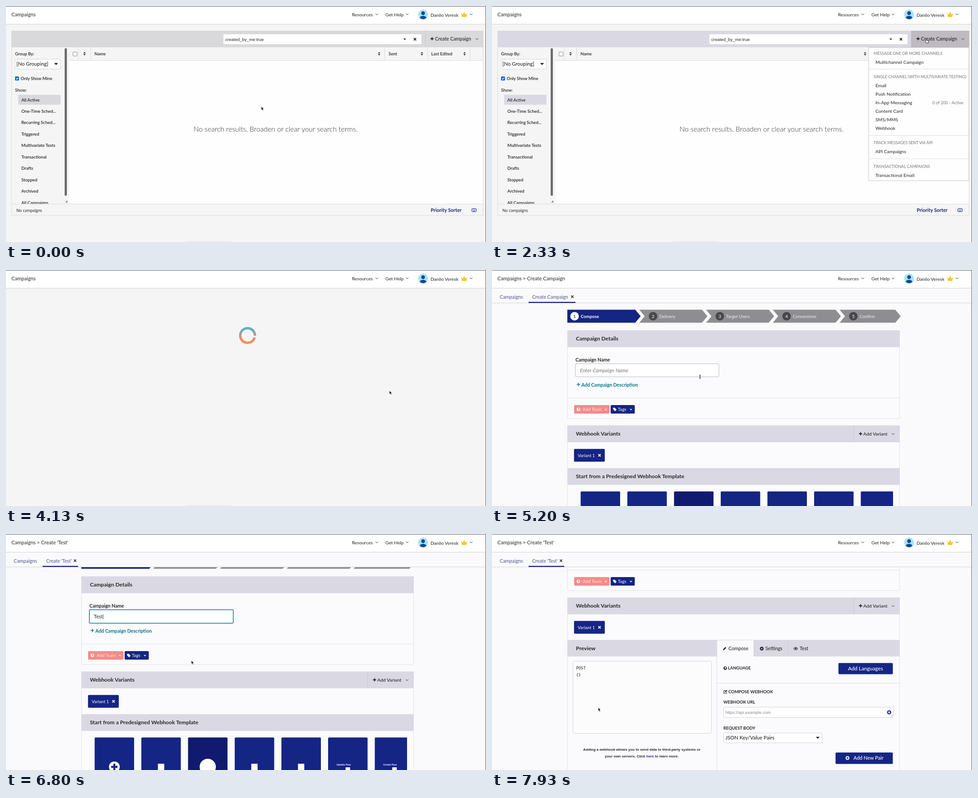
Write an HTML page that moves like this. It is 1064 px wide and 526 px high and loops after 8000 ms.

```html
<!DOCTYPE html>
<html lang="en">
<head>
<meta charset="utf-8">
<title>Create a webhook campaign</title>
<style>
  html, body { margin: 0; width: 100%; height: 100%; overflow: hidden; background: #f5f5f5; }
  svg { display: block; width: 1064px; height: 526px; font-family: Lato, sans-serif; }
  .arial { font-family: "Liberation Sans", Arial, sans-serif; }
  .mono { font-family: "DejaVu Sans Mono", monospace; }
  .italic { font-style: italic; }
  .mid { text-anchor: middle; }
  .dashed { stroke-dasharray: 3 2; }
  .dotted { stroke-dasharray: 1 1; }
</style>
</head>
<body>
<svg id="stage" viewBox="0 0 1064 526"></svg>
<script>
const LOOP = 8000;
const INK = '#252528', NAVY = '#152584', LILAC = '#dad9e3', TEAL = '#03788a', RULE = '#dcdce0', PAGE = '#fafafc';
const stage = document.getElementById('stage');

// Drawing helpers
const text = (x, y, s, size = 10.3, weight = 400, fill = INK, cls = '') =>
  `<text x="${x}" y="${y}" font-size="${size}" font-weight="${weight}" fill="${fill}" class="${cls}">${s}</text>`;
const rect = (x, y, w, h, fill, rx = 0, stroke = 'none', width = 1) =>
  `<rect x="${x}" y="${y}" width="${w}" height="${h}" fill="${fill}" rx="${rx}" stroke="${stroke}" stroke-width="${width}"/>`;
const box = (x, y, w, h, fill, rx, stroke) => rect(x + .5, y + .5, w - 1, h - 1, fill, rx, stroke);
const path = (d, fill, stroke = 'none', width = 1, cls = '') =>
  `<path d="${d}" fill="${fill}" stroke="${stroke}" stroke-width="${width}" class="${cls}"/>`;
const line = (d, stroke = INK, width = 1, cls = '') => path(d, 'none', stroke, width, cls);
const dot = (x, y, r, fill) => `<circle cx="${x}" cy="${y}" r="${r}" fill="${fill}"/>`;
const group = (body, attrs) => `<g ${attrs}>${body}</g>`;
const hline = (x, y, w, color = RULE) => rect(x, y, w, 1, color);
const vline = (x, y, h, color = RULE) => rect(x, y, 1, h, color);

// Icons
const chevron = (x, y) => line(`M${x - 2.8} ${y - 1.4}l2.8 2.8 2.8-2.8`, INK, 1);
const caret = (x, y, w = 3, fill = INK) => path(`M${x - w} ${y - w / 2}h${2 * w}l${-w} ${w * 1.15}z`, fill);
const plus = (x, y, r, color = INK, width = 2) => line(`M${x - r} ${y}h${2 * r}M${x} ${y - r}v${2 * r}`, color, width);
const cross = (x, y, color = INK) => line(`M${x - 2.6} ${y - 2.6}l5.2 5.2m0-5.2l-5.2 5.2`, color, 1.9);
const plusDot = (x, y, r, fill, mark) => dot(x, y, r, fill) + plus(x, y, r * .58, mark, r * .36);
const sorter = (x, y) => path(`M${x - 2.7} ${y - .7}l2.7-3 2.7 3zM${x - 2.7} ${y + .9}l2.7 3 2.7-3z`, INK);
const globe = (x, y, land, sea) =>
  dot(x, y, 3.8, land) + path(`M${x - .6} ${y - 2.4}l2.6.3.6 1.8-2 .8-.4 2.2-1.5-2.2z`, sea);
const resizer = (x, y) => path(`M${x} ${y}v-5l-5 5z`, '#88888b');

// Timing helpers
const clamp01 = v => Math.max(0, Math.min(1, v));
const smooth = k => k * k * (3 - 2 * k);
function track(keys, t, ease = k => k) {
  const i = keys.findIndex(k => k[0] > t);
  if (i < 0) return keys[keys.length - 1].slice(1);
  if (i === 0) return keys[0].slice(1);
  const a = keys[i - 1], b = keys[i], k = ease(clamp01((t - a[0]) / (b[0] - a[0])));
  return a.slice(1).map((v, n) => v + (b[n + 1] - v) * k);
}

const HOVER = 1930, MENU = 2200, LOADING = 3330, FORM = 4730, FOCUS = 5530, TYPING = 5730, PICKED = 7600;
const SCROLL = [[6600, 0], [6730, 10], [6800, 40], [7000, 160], [7200, 205]];
const POINTER = [
  [0, 566, 224], [800, 566, 224], [1800, 963, 73], [2400, 963, 73], [2900, 864, 268], [3400, 850, 269],
  [4130, 850, 269], [4530, 800, 282], [5130, 461, 238], [5330, 461, 238], [5500, 440, 224],
  [6300, 440, 224], [6500, 411, 282], [7130, 411, 282], [7530, 235.5, 387]
];

function header(crumb) {
  return rect(0, 0, 1064, 40, '#fff') + hline(0, 40, 1064, '#cfcfd1') +
    text(12, 22.5, crumb, 11.2) +
    text(767, 22.5, 'Resources') + chevron(822, 18.5) +
    text(841, 22.5, 'Get Help') + chevron(889, 18.5) +
    dot(924.5, 19, 11, '#a8e4fa') + dot(924.5, 16, 4.2, '#104a96') +
    path('M917.3 26.5c0-6 14.4-6 14.4 0q-7 6-14.4 0z', '#104a96') +
    text(941, 24, 'Danilo Veresk') +
    path('M1009 15.5l3.2 4 3.3-6.5 3.3 6.5 3.2-4-1.4 9h-10.2z', '#f2ca24') + chevron(1031, 18.5);
}

function listPage(t) {
  const bar = t < HOVER ? '#d9d8da' : LILAC, grey = '#f5f5f6';
  const views = ['All Active', 'One-Time Sched...', 'Recurring Sched...', 'Triggered', 'Multivariate Tests',
    'Transactional', 'Drafts', 'Stopped', 'Archived', 'All Campaigns'];
  const label = (x, y, s) => text(x, y, s, 9.6, 600);
  return rect(12, 92, 1046, 350, '#fefefe') + rect(12, 92, 128, 350, grey) + rect(140, 92, 918, 29, grey) +
    hline(140, 121, 918) + [160, 187, 839, 934, 1028].map(x => vline(x, 92, 29)).join('') +
    rect(12, 55, 1046, 37, bar) +
    rect(482, 63, 439, 22, '#fff', 1) + text(486, 77.5, 'created_by_me:true', 9.6, 400, INK, 'arial') +
    caret(884, 74) + cross(906.5, 74) +
    (t < HOVER ? line('M929.5 55v37', '#bcbcc0', 1, 'dashed') : rect(929, 55, 129, 37, '#bfbac1')) +
    plus(944.5, 73, 3.6) + text(951, 77, 'Create Campaign', 10.6, 500) + chevron(1044, 73.5) +
    label(20, 110, 'Group By:') + box(20, 118, 101, 23, '#fff', 2, '#d0d0d4') +
    text(23, 133, '[No Grouping]', 11.3, 500) + caret(111, 129, 4.2) +
    rect(20, 157, 9, 9, '#0b68e0', 1.5) + line('M22 161.5l2 2 3.3-4.2', '#fff', 1.3) +
    label(32.5, 165, 'Only Show Mine') + label(20, 190.5, 'Show:') +
    rect(27, 198, 94, 22, bar, 1) +
    views.map((v, i) => label(34, 212.5 + 25.47 * i, v)).join('') +
    rect(130, 94, 5, 329, '#6d6d70', 2.5) + resizer(136, 438) +
    box(148, 102, 10, 10, '#fff', 1.5, '#88888c') +
    [174, 827, 922, 1016.5].map(x => sorter(x, 106.3)).join('') +
    label(196, 110, 'Name') + label(848, 110, 'Sent') + label(942.5, 110, 'Last Edited') +
    text(597.5, 279.5, 'No search results. Broaden or clear your search terms.', 15.7, 300, '#2c2c2f', 'mid') +
    rect(12, 442, 1046, 24, grey) + hline(12, 441, 1046) + hline(12, 466, 1046) +
    vline(12, 92, 375) + vline(1057, 92, 375) +
    text(23, 458.5, 'No campaigns', 9.2) + text(941.5, 458.5, 'Priority Sorter', 10.8, 700, '#1b2870') +
    box(1032, 451, 11, 8, '#e8e9f4', 1, '#1b2870') +
    line('M1034 453.7h7', '#1b2870', 1, 'dotted') + line('M1035 456.5h5', '#1b2870') +
    (t >= MENU ? menu() : '');
}

function menu() {
  const head = (y, s) => text(846, y, s, 8.8, 400, '#727277');
  const items = [['Multichannel Campaign', 129], ['Email', 181], ['Push Notification', 200], ['In-App Messaging', 219],
    ['Content Card', 238], ['SMS/MMS', 257], ['Webhook', 276], ['API Campaigns', 328], ['Transactional Email', 381]];
  return box(834.5, 92, 223, 298, '#fefefe', 0, '#c6c6cb') +
    [140, 288, 340].map(y => hline(835, y, 222)).join('') +
    head(108.5, 'MESSAGE ONE OR MORE CHANNELS') + head(161, 'SINGLE CHANNEL (WITH MULTIVARIATE TESTING)') +
    head(308, 'TRACK MESSAGES SENT VIA API') + head(360.5, 'TRANSACTIONAL CAMPAIGNS') +
    items.map(([s, y]) => text(850, y, s)).join('') +
    text(976, 218.5, '0 of 200 - Active', 9.4, 400, '#727277');
}

function spinner(t) {
  const turn = 16 + (t - 4130) * .36;
  return `<linearGradient id="ring" x1="0" y1="0" x2="0" y2="1" gradientTransform="rotate(-16 .5 .5)">
    <stop offset=".1" stop-color="#62b1bf"/><stop offset=".52" stop-color="#d58b90"/><stop offset=".9" stop-color="#ff8b54"/>
    </linearGradient><circle cx="535.5" cy="146" r="16.3" fill="none" stroke="url(#ring)" stroke-width="5.4"
    pathLength="360" stroke-dasharray="346 14" transform="rotate(${turn} 535.5 146)"/>`;
}

function steps() {
  return ['Compose', 'Delivery', 'Target Users', 'Conversions', 'Confirm'].map((name, i) => {
    const x = i ? 178.5 + 148 * i : 167, end = Math.min(317.5 + 148 * i, 894), cx = i ? 209 + 148 * i : 183;
    return path(`M${x} 88.5H${end}l12 14.5-12 14.5H${x}${i ? 'l12-14.5' : ''}z`, i ? '#8e8d92' : NAVY) +
      dot(cx, 103, 9.5, i ? '#48484b' : '#fff') +
      text(cx, 106.8, i + 1, 10.4, 500, i ? '#eee' : NAVY, 'mid') +
      text(cx + 13.7, 106.7, name, 9.7, i ? 400 : 700, i ? '#f1f1f4' : '#fff');
  }).join('');
}

const cardHead = (y, title, h = 37.5) => rect(167, y, 737, h, LILAC) + text(186, y + 22.6, title, 12.1, 700);

function details(t, typed) {
  const focused = t >= FOCUS;
  const field = focused ? rect(184.8, 208.8, 318.9, 29.9, '#fff', 2, TEAL, 1.5)
                        : box(184.5, 208.5, 319, 30, '#fff', 2, '#b6b6bc');
  const caretX = 195 + [0, 6, 12, 16.7, 20.7][typed.length];
  return box(167, 134.5, 737, 197, '#fbfbfd', 1, '#e2e2e8') + cardHead(134.5, 'Campaign Details') +
    text(185, 204, 'Campaign Name', 10.5, 700) + field +
    (typed ? text(194.5, 228, typed, 11.6) : text(195, 228, 'Enter Campaign Name', 11.5, 400, '#77777c', 'italic')) +
    (focused ? vline(caretX, 218, 12, '#777') : '') +
    plus(191.5, 255, 3.8, TEAL, 1.7) + text(198, 259.7, 'Add Campaign Description', 10.5, 700, TEAL) +
    hline(168, 285, 735, '#e2e2e8') +
    rect(182, 301, 78.5, 19, '#f68a8a', 2) + globe(191.5, 310.5, '#fff', '#f68a8a') +
    text(201, 314.3, 'Add Team', 9.8, 400, '#ffe6e6') + caret(252.5, 311, 2.7, '#fff') +
    rect(263, 301, 53.5, 19, NAVY, 2) + path('M268.5 307h3.6l4.2 4.2-3.5 3.6-4.3-4.3z', '#fff') +
    text(279, 314.3, 'Tags', 9.7, 400, '#fff') + caret(308, 311, 2.7, '#fff');
}

function templates(t) {
  const names = ['Blank Template', 'Zelvo', 'Palbrook', 'Vurpo', 'Yoz.test', 'Cardnub', 'Cardnub'];
  const square = (x, y, size) => rect(x - size / 2, y - size / 2, size, size, '#fff');
  const tiles = names.map((name, i) => {
    const x = 196.5 + 103.5 * i, cx = x + 43.7;
    const mark = i === 0 ? plusDot(cx, 559, 12, '#fff', NAVY)
      : i === 2 ? dot(cx, 559, 18, '#fff')
      : i < 5 ? square(cx, 559, 14)
      : square(cx, 565, 10) + text(cx - 25, 555.5, i === 5 ? 'Update Pass' : 'Create Pass', 5.8, 700, '#fff');
    return rect(x, 493.5, 87.5, 131, i === 2 && t < 6930 ? '#101b70' : NAVY, 2) + mark +
      text(cx + .8, 641, name, 10.2, 400, INK, 'mid') +
      (i === 2 ? text(cx + .8, 651.7, 'Whisperer', 10.2, 400, INK, 'mid') : '');
  }).join('');
  return cardHead(441.5, 'Start from a Predesigned Webhook Template') +
    group(tiles, 'clip-path="url(#row)"') + rect(184, 662, 430, 5, '#6e6e72', 2.5) +
    rect(167, 676, 737, 37, LILAC) + rect(461, 684.5, 435, 22, '#fff', 1);
}

function composer() {
  const caps = (x, y, s) => text(x, y, s, 9.4, 700);
  const tab = (x, s) => text(x, 259, s, 10.7, 500);
  return cardHead(236, 'Preview', 37) + rect(498.5, 237, 82, 37, PAGE) +
    vline(498, 237, 300) + vline(580, 237, 36, '#c8c7d2') + vline(656, 237, 36, '#c8c7d2') +
    box(179, 283, 308, 162, '#fcfcfd', 3, '#d4d4da') +
    text(186.5, 301.5, 'POST', 8.8, 400, INK, 'mono') + text(186.5, 316.5, '{}', 8.8, 400, INK, 'mono') +
    text(332, 483, 'Adding a webhook allows you to send data to third-party systems or', 8, 700, INK, 'arial mid') +
    text(332, 497.5, `your own servers. Click <tspan fill="${NAVY}">here</tspan> to learn more.`, 8, 700, INK, 'arial mid') +
    path('M512 259l.7-2.6 4.6-4.6 2 2-4.6 4.6z', INK) + tab(524, 'Compose') +
    `<circle cx="598" cy="255.5" r="2.6" fill="none" stroke="${INK}" stroke-width="2.2"/>` +
    line('M598 251v1.5m0 6v1.5m-4.5-4.5h1.5m6 0h1.5m-7.7-3.2l1 1m4.4 4.4l1 1m0-6.4l-1 1m-4.4 4.4l-1 1', INK, 1.6) +
    tab(606, 'Settings') +
    path('M668.8 255.5q4.4-6 8.8 0q-4.4 6-8.8 0z', 'none', INK, 1.1) + dot(673.2, 255.2, 1.7, INK) + tab(682, 'Test') +
    globe(517, 299, INK, '#fff') + caps(523, 302.3, 'LANGUAGE') +
    rect(768, 287.5, 120.5, 25, NAVY, 2) + text(828, 304, 'Add Languages', 11.6, 500, '#fff', 'mid') +
    hline(498, 332, 406) +
    line('M519 349h-5v6h6v-3', INK, 1.1) + line('M516.5 352.5l4.5-4.5', INK, 1.8) + caps(524, 355, 'COMPOSE WEBHOOK') +
    caps(513, 378.3, 'WEBHOOK URL') + box(513, 385.5, 377, 24, '#fff', 2, '#d0d0d6') +
    text(517.5, 401, 'https://api.example.com', 9.5, 400, '#88888c', 'arial') +
    plusDot(880.3, 397.5, 4.6, NAVY, '#fff') + line('M884 408l4-4m-1.5 4l1.5-1.5', '#999', .8) +
    caps(513, 435.7, 'REQUEST BODY') + box(513, 443, 219, 23, '#fff', 2, '#d0d0d6') +
    text(517.5, 458, 'JSON Key/Value Pairs', 11.2, 500) + caret(722, 454, 4) +
    rect(761.5, 487, 127, 25.5, NAVY, 2) + plusDot(788, 499.3, 4.2, '#fff', NAVY) +
    text(834.5, 503.3, 'Add New Pair', 11, 500, '#fff', 'mid');
}

function formPage(t, typed, title) {
  const [scroll] = track(SCROLL, t), tabEnd = typed ? 160 - 3.6 * (4 - typed.length) : 185;
  const variants = box(167, 346.5, 737, 420, '#fbfbfd', 1, '#e2e2e8') + cardHead(346.5, 'Webhook Variants') +
    vline(801, 347, 37, '#c6c5d0') + plus(817, 365, 3.6) + text(823, 369, 'Add Variant', 10.4, 500) + chevron(889, 365.5) +
    rect(181.8, 398.8, 68.2, 28.5, NAVY, 2) + text(190, 417, 'Variant 1', 9.7, 400, '#fff') + cross(238.3, 413, '#fff');
  const body = steps() + details(t, typed) + variants +
    (t < PICKED ? templates(t) : group(composer(), 'transform="translate(0 205)"'));
  return `<clipPath id="view"><path d="M0 73h1064v453H0z"/></clipPath>
    <clipPath id="row"><path d="M168 480h721v190H168z"/></clipPath>` +
    rect(0, 41, 1064, 485, PAGE) +
    group(group(body, `transform="translate(0 ${-scroll})"`), 'clip-path="url(#view)"') +
    hline(0, 73, 1064, '#d4d4da') +
    text(17, 63.7, 'Campaigns', 10.8, 400, '#4c5590') + text(89, 63.7, title, 10.6, 400, '#4c5590') +
    cross(tabEnd - 7, 59.5, '#444448') + rect(81, 71, tabEnd - 81, 2.4, NAVY);
}

function pointer(t) {
  if (t >= TYPING && t < 6330) return '';
  const [x, y] = track(POINTER, t, smooth);
  const hand = (t >= 1730 && t < LOADING) || (t >= 7400 && t < PICKED);
  const beam = t >= 5130 && t < TYPING;
  const shape = beam ? line('M-1.8-4q1.8 0 1.8 1.2v5.6q0 1.2-1.8 1.2M1.8-4q-1.8 0-1.8 1.2v5.6q0 1.2 1.8 1.2', '#222', .9)
    : hand ? path('M-1.2 4.5V.8q1-1.2 1.8 0v2.6l3.4.9q1 .3.8 1.4l-.6 3.6h-4.7l-2.3-3.6q.4-1 1.6-.2z', '#fff', '#111', .9)
    : path('M0 0v7.8l1.8-1.6 1.3 2.9 1.5-.7-1.3-2.8h2.3z', '#111', '#fff', .6);
  return group(shape, `transform="translate(${x} ${y})"`);
}

function scene(t) {
  const typed = 'Test'.slice(0, Math.max(0, Math.floor((t - TYPING) / 130) + 1));
  const title = typed ? `Create '${typed}'` : 'Create Campaign';
  const inForm = t >= FORM;
  return rect(0, 0, 1064, 526, '#f5f5f5') +
    (inForm ? formPage(t, typed, title) : rect(403, 525, 94, 1, '#e0e0e0') + (t < LOADING ? listPage(t) : spinner(t))) +
    header(inForm ? 'Campaigns &gt; ' + title : 'Campaigns') +
    rect(0, 0, 1064, 1, '#58585b') + rect(1063, 0, 1, 526, '#58585b') + pointer(t);
}

// The picture advances in alternating holds of 130 and 70 ms
let shown = -1;
function tick() {
  const t = performance.now() % LOOP, part = t % 200;
  const step = Math.round(t - part) + (part >= 130 ? 130 : 0);
  if (step !== shown) stage.innerHTML = scene(shown = step);
  requestAnimationFrame(tick);
}
tick();
</script>
</body>
</html>
```
